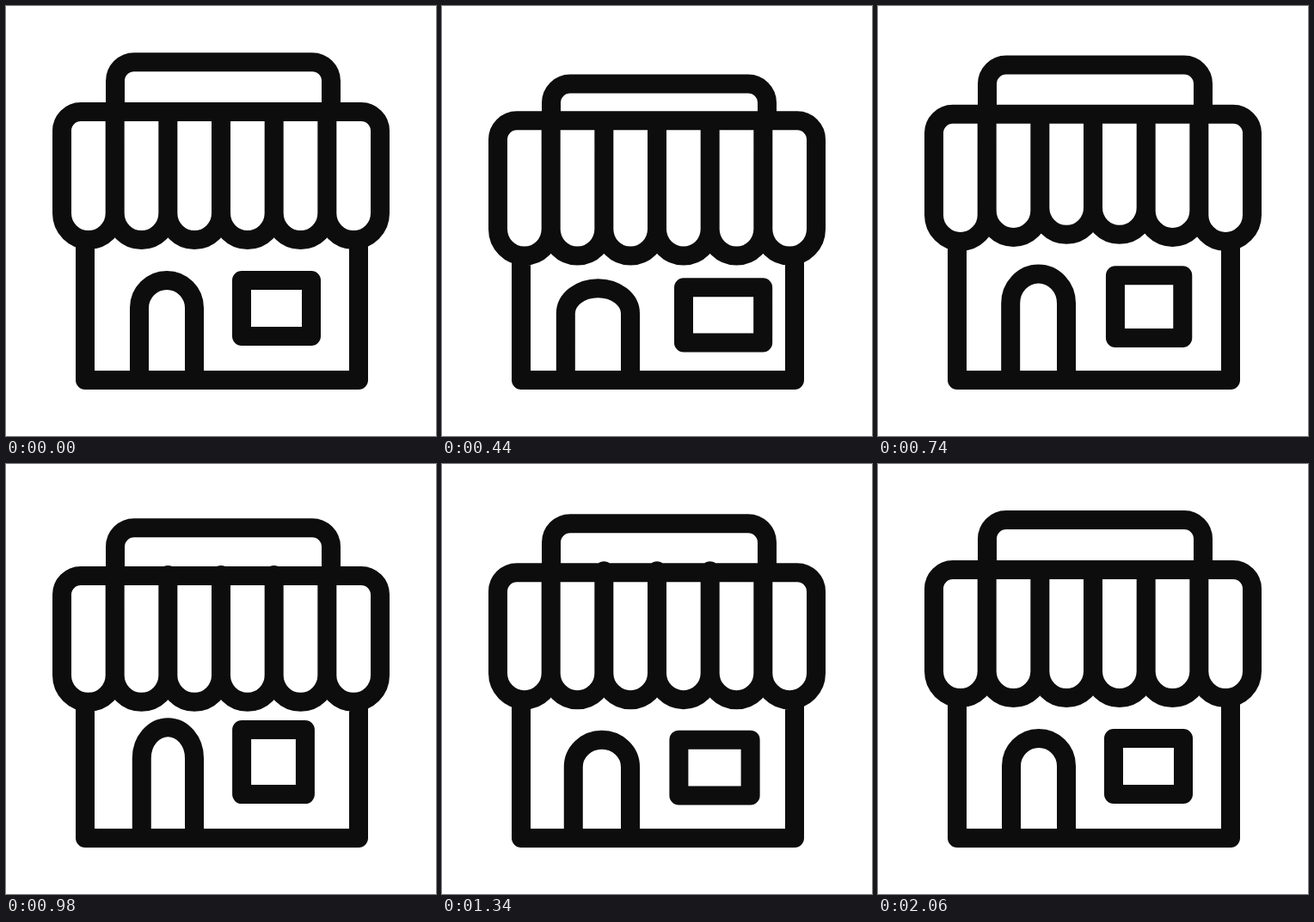
These frames come from a looping animation (500x500 px, 3020 ms). An HTML page:

```html
<!DOCTYPE html>
<html lang="en">
<head>
<meta charset="utf-8">
<title>Shop</title>
<style>
html, body { margin: 0; width: 100%; height: 100%; overflow: hidden; background: #fff; }
svg { display: block; width: 100%; height: 100%; }
path { fill: none; stroke: #0d0d0d; stroke-width: 22; stroke-linejoin: round; stroke-linecap: round; }
</style>
</head>
<body>
<svg viewBox="0 0 500 500"><path id="shop"/></svg>
<script>
const LOOP = 3020, SWING = 450;
const LEFT = 65, RIGHT = 435, BAYS = 6, BAY = (RIGHT - LEFT) / BAYS;
const CORNER = 22, SCALLOP = 31;
const shop = document.getElementById('shop');

// Half sine between two times, zero outside
const hop = (t, from, to) =>
  t > from && t < to ? Math.sin(Math.PI * (t - from) / (to - from)) : 0;

// Eased rise and fall; neighbours one SWING apart blend into each other
const pose = (t, peak) => hop(t, peak - SWING, peak + SWING) ** 2;

// Open-bottomed frame with two rounded top corners
const frame = (x1, x2, top, foot, r = CORNER, ry = r) =>
  `M${x1} ${foot}V${top + ry}a${r} ${ry} 0 0 1 ${r} ${-ry}H${x2 - r}a${r} ${ry} 0 0 1 ${r} ${ry}V${foot}`;

function awning(t) {
  const big = hop(t, 0, 660), small = hop(t, 640, 1460);
  const lift = 8.5 * hop(t, 640, 860);
  const roof = 65 + 29.5 * big + 9.5 * small;
  const beam = 123 + 12 * big + 7.2 * small;
  const hem = 241 + 21.5 * big + 5 * small;
  const stripeTop = beam - 2 * hop(t, 860, 1640);
  const shoulder = beam + CORNER;

  let d = frame(127, 378, roof, beam) + frame(LEFT, RIGHT, beam, shoulder);
  for (let i = 0; i < BAYS; i++) {
    const x = LEFT + i * BAY, y = hem - lift * Math.sin(Math.PI * i / (BAYS - 1));
    d += `M${x} ${shoulder}V${y}a${BAY / 2} ${SCALLOP} 0 0 0 ${BAY} 0V${shoulder}`;
    if (i) d += `M${x} ${stripeTop}V${shoulder}`;
  }
  const eaves = hem + SCALLOP;
  return d + `M92 ${eaves}V435H410V${eaves}`;
}

function openings(t) {
  const wide = pose(t, SWING) + .2 * pose(t, 3 * SWING);
  const tall = pose(t, 2 * SWING);
  const mix = (rest, w, h) => rest + w * wide + h * tall;

  const doorLeft = mix(155, -11.2, 3.2), doorTop = mix(319, 9.2, -14);
  const arch = 32 - .3 * (doorTop - 319);
  const left = mix(274, 7, 0), right = mix(355, 18.2, -8);
  const top = mix(319, 8.2, -11), bottom = mix(384, 7.4, 0);
  return frame(doorLeft, 219, doorTop, 435, (219 - doorLeft) / 2, arch) +
    `M${left} ${top}H${right}V${bottom}H${left}Z`;
}

function draw() {
  const t = performance.now() % LOOP;
  shop.setAttribute('d', awning(t) + openings(t));
  requestAnimationFrame(draw);
}
draw();
</script>
</body>
</html>
```
